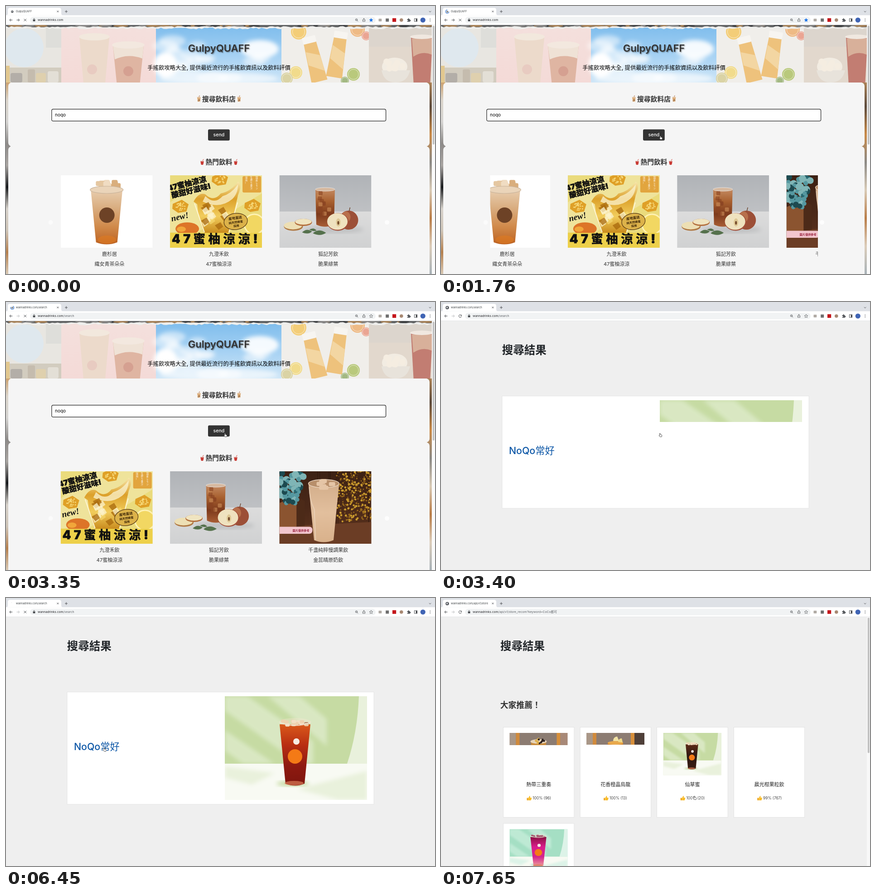
Recreate the animation shown at these times as an HTML page. Size 947x592 px, loop 8 s.

```html
<!DOCTYPE html>
<html lang="zh-Hant">
<head>
<meta charset="utf-8">
<style>
html,body{margin:0;width:100%;height:100%;overflow:hidden;background:#efefef}
svg{display:block;width:947px;height:592px;font-family:Inter,'Noto Sans CJK TC','Noto Sans CJK',sans-serif}
.mid{text-anchor:middle}
.bold{font-weight:700}
.black{font-weight:900;stroke:#111;stroke-width:.7}
</style>
</head>
<body>
<svg id="stage" viewBox="0 0 947 592"></svg>
<script>
const LOOP = 8000;
const TICKS = [0, 310, 770, 1020, 1240, 1390, 1570, 1760, 1950, 2210, 2460, 2600, 2750, 2930, 3240, 3350,
  3400, 4040, 5100, 5180, 5260, 5340, 6450, 6530, 7090, 7170, 7650];
const CURSOR = [[1570, 485.5, 291], [2750, 484.5, 294], [4040, 486, 293], [5100, 420, 312], [5180, 310, 340],
  [5260, 240, 347], [5340, 218, 335], [7090, 400, 390], [7170, 560.5, 441.5]];

const rect = (x, y, w, h, fill, more = '') => `<rect x="${x}" y="${y}" width="${w}" height="${h}" fill="${fill}" ${more}/>`;
const oval = (x, y, rx, ry, fill, more = '') => `<ellipse cx="${x}" cy="${y}" rx="${rx}" ry="${ry}" fill="${fill}" ${more}/>`;
const dot = (x, y, r, fill, more = '') => oval(x, y, r, r, fill, more);
const path = (d, fill, more = '') => `<path d="${d}" fill="${fill}" ${more}/>`;
const line = (d, color, w = 1, more = '') => path(d, 'none', `stroke="${color}" stroke-width="${w}" ${more}`);
const text = (x, y, size, s, fill = '#333', more = '') => `<text x="${x}" y="${y}" font-size="${size}" fill="${fill}" ${more}>${s}</text>`;
const group = (s, more = '') => `<g ${more}>${s}</g>`;
const at = (x, y, s, scale = 1) => group(s, `transform="translate(${x} ${y}) scale(${scale})"`);
const clipRect = (id, x, y, w, h) => `<clipPath id="${id}">${rect(x, y, w, h, '#000')}</clipPath>`;
const gradient = (id, ...colors) => `<linearGradient id="${id}" x2="0" y2="1">${colors.map((c, i) =>
  `<stop offset="${i / (colors.length - 1)}" stop-color="${c}"/>`).join('')}</linearGradient>`;
const noise = n => { const v = Math.sin(n * 12.9898) * 43758.5453; return v - Math.floor(v); };
const scatter = (n, seed, draw) => Array.from({length: n}, (_, i) =>
  draw(noise(seed + i * 3), noise(seed + i * 3 + 1), noise(seed + i * 3 + 2))).join('');
const pick = (list, u) => list[Math.floor(u * list.length)];
const tumbler = (x, top, bottom, wTop, wBottom, fill, more) => path(
  `M${x - wTop / 2} ${top}H${x + wTop / 2}L${x + wBottom / 2} ${bottom - 4}Q${x} ${bottom + 5} ${x - wBottom / 2} ${bottom - 4}Z`, fill, more);

const defs = `<defs>
${gradient('sky', '#7dbcec', '#a3d0f3', '#cfe6f7')}
${gradient('milkTea', '#e8cdae', '#d9ad80', '#d18b4c', '#bc6222')}
${gradient('honey', '#f7e7ac', '#dca02a', '#f1cc5c', '#c88a1c')}
${gradient('amber', '#c48a62', '#a8602f', '#7d3a1c', '#a85d34')}
${gradient('latte', '#d3ae8b', '#e2bf9d', '#d9b18b')}
${gradient('redTea', '#d9591b', '#b92f12', '#8f1a10', '#7d150e')}
${gradient('darkTea', '#5b2a16', '#2c1712', '#3a1c12')}
${gradient('berry', '#8e1244', '#d91c8c', '#d3258d', '#f0a49b')}
${gradient('wall', '#b0b3b7', '#bfc1c4')}
${gradient('table', '#dcdcdc', '#d0d1d2')}
${gradient('wood', '#3c2114', '#4a2818', '#5e341e')}
${gradient('leftEdge', '#c9975c', '#dcd6cc', '#d6d5d3', '#8d8a88', '#a9a5a2', '#15171a', '#d8d3cc', '#cfc5b8', '#b5804e', '#d9c9b4')}
${gradient('rightEdge', '#b88b5b', '#5b4a3c', '#c98a48', '#8c8a86', '#d9cbb7', '#b97d48', '#dccdba', '#a8b2b8')}
${gradient('pinkWall', '#f4e0dd', '#f4dad7')}
<filter id="soft"><feGaussianBlur stdDeviation="5"/></filter>
<filter id="shadow"><feDropShadow dx="1.3" dy="1.3" stdDeviation=".8" flood-opacity=".45"/></filter>
${clipRect('bannerClip', 0, 42, 940, 127)}${clipRect('track', 108.5, 370, 723.5, 222)}${clipRect('photo', 0, 0, 203, 160)}
${clipRect('wide', 0, 0, 314, 229)}${clipRect('tabText', 20, 4, 84, 18)}${clipRect('strip1', 0, 0, 128, 27)}${clipRect('strip2', 0, 0, 128, 26)}
<clipPath id="loaded"><rect id="loadedRect" x="483" y="217" width="314" height="229"/></clipPath></defs>`;

function browser() {
  const ink = '#44474b';
  return rect(0, 0, 947, 20.5, '#dee1e6') + path('M0 20.5Q4 20.5 4 16V9Q4 4 9 4H117Q122 4 122 9V16Q122 20.5 126 20.5Z', '#fff')
    + rect(0, 20.5, 947, 21, '#fff') + rect(0, 41, 947, .6, '#dcdee1')
    + group(text(22, 14.4, 5.75, '', '#3c4043', 'id="tabTitle"'), 'clip-path="url(#tabText)"')
    + line('M112.6 10.3l3.6 3.6m0-3.6l-3.6 3.6M130 12.2h6m-3-3v6M933.8 11.2l2.3 2.2 2.3-2.2', ink, .9)
    + line('M14.2 31H8m2.8-2.9L7.9 31l2.9 2.9', ink, 1)
    + line('M23.4 31h6.2m-2.8-2.9l2.9 2.9-2.9 2.9', ink, 1, 'id="forward"')
    + line('M39.7 28.4l5.2 5.2m0-5.2l-5.2 5.2', ink, 1, 'id="stop"')
    + group(line('M44.7 29.2A3 3 0 1 0 45.2 32', ink, 1) + path('M45.6 27.8v2.9h-2.9z', ink), 'id="reload"')
    + rect(53, 23.8, 763, 14.4, '#f1f3f4', 'rx="7.2"')
    + rect(59.6, 30, 4.8, 3.8, ink, 'rx=".6"') + line('M60.6 30v-1a1.4 1.4 0 0 1 2.8 0v1', ink, .8)
    + text(70, 33.4, 6.75, '<tspan fill="#202124">wannadrinks.com</tspan><tspan id="urlPath"></tspan>', '#5f6368')
    + dot(773.6, 30.4, 2.2, 'none', `stroke="${ink}" stroke-width=".8"`) + line('M775.2 32l2.1 2.1M772.5 30.4h2.2', ink, .8)
    + line('M788.4 30h-1v4h5.2v-4h-1M790 32.2v-5m-1.5 1.4l1.5-1.5 1.5 1.5', ink, .8)
    + path('M806 27.2l1.1 2.5 2.7.2-2.1 1.8.7 2.7-2.4-1.4-2.4 1.4.7-2.7-2.1-1.8 2.7-.2z', 'none', 'id="star" stroke-width=".7"')
    + rect(822.5, 28, 6.8, 6, '#b1aba5', 'rx="1"') + rect(838.2, 27.6, 7, 7, '#6d6d6d') + rect(853, 27, 8.2, 8, '#c4161c')
    + dot(872.8, 31, 3.8, '#a78872')
    + path('M885.5 29h2a1.3 1.3 0 1 1 2.4 0h1.8v2a1.3 1.3 0 1 1 0 2.3v1.5h-6.2v-1.6a1.3 1.3 0 1 0 0-2.3z', '#55585c')
    + rect(901.4, 28, 6.2, 6, 'none', `stroke="${ink}" stroke-width=".9"`) + rect(904.8, 28, 2.8, 6, ink)
    + dot(920.3, 31, 5.6, '#4064b4') + [28.3, 31, 33.7].map(y => dot(936.2, y, .75, ink)).join('')
    + '<g id="tabIcon"></g>';
}

function banner() {
  const tube = (x, y, turn) => group(path('M-14-38H14L18 50H-18Z', '#eec27c') + rect(-15, -52, 30, 15, '#f7f5f1', 'rx="2"')
    + path('M-14-20L15-6 17 30-15 10Z', '#f3d6a2'), `transform="translate(${x} ${y}) rotate(${turn})"`);
  const slice = (x, y, r, c) => dot(x, y, r, c) + dot(x, y, r * .8, 'none', 'stroke="#fff" stroke-opacity=".6"');
  const torn = 'M0 46' + Array.from({length: 158}, (_, i) => `L${i * 6} ${44.5 + 3 * noise(i)}`).join('')
    + Array.from({length: 158}, (_, i) => `L${942 - i * 6} ${47.5 + 4 * noise(i + 300)}`).join('') + 'Z';
  return group(rect(0, 42, 122, 127, '#e8e6e1') + rect(88, 42, 34, 50, '#dededa') + rect(0, 136, 122, 33, '#d2ccbf')
    + dot(40, 92, 43, '#dfe8ee') + rect(0, 132, 8, 37, '#e2c88f') + rect(10, 148, 26, 21, '#b3aea8', 'rx="4"')
    + rect(48, 140, 16, 29, '#c5bcae', 'rx="3"') + rect(66, 148, 22, 21, '#dfd0ae', 'rx="4"') + rect(92, 144, 24, 25, '#e3dfd6', 'rx="4"')
    + rect(122, 42, 209, 127, 'url(#pinkWall)') + tumbler(195, 70, 174, 66, 48, '#ecdacb') + oval(195, 68, 34, 8, '#f2e8dd')
    + tumbler(270, 88, 180, 68, 50, '#dfb5a2') + path('M236 88H304L301 116Q270 104 240 118Z', '#efe2d6') + oval(270, 86, 36, 8, '#f3e8df')
    + dot(190, 140, 11, '#e8cbc1') + dot(270, 144, 11, '#d5a091')
    + rect(331, 42, 277, 127, 'url(#sky)') + group(scatter(18, 40, (a, b, c) =>
      oval(345 + a * 250, 70 + b * 95, 14 + c * 26, 7 + c * 10, '#fff', 'opacity=".5"')) + oval(352, 130, 26, 28, '#fff')
      + oval(560, 95, 42, 20, '#fff', 'opacity=".9"') + oval(470, 160, 130, 14, '#fff', 'opacity=".6"'), 'filter="url(#soft)"')
    + rect(608, 42, 193, 127, '#f0eeea') + slice(646, 57, 17, '#f3cd78') + slice(776, 52, 16, '#eeba85') + slice(795, 66, 10, '#eaa593')
    + slice(640, 147, 14, '#f1db8c') + slice(620, 160, 13, '#dad3a5') + tube(680, 118, -14) + tube(732, 108, 9)
    + slice(767, 151, 14, '#b9c97c') + slice(748, 165, 9, '#a3b983')
    + rect(801, 42, 139, 127, '#e2d8cd') + rect(801, 42, 139, 48, '#dcd5cd') + oval(858, 134, 28, 20, '#f2ece2')
    + path('M829 142H892Q886 169 860 169Q834 169 829 142Z', '#e8e3db') + scatter(8, 9, (a, b) => dot(840 + a * 36, 120 + b * 18, 7, '#f5ede1'))
    + tumbler(918, 70, 180, 48, 36, '#c27d72') + path('M896 72H941V108Q920 98 899 112Z', '#d8b09a') + oval(918, 68, 26, 5, '#f0e8e0')
    + rect(0, 42, 940, 5, '#626465') + scatter(60, 77, (a, b, c) => oval(a * 940, 44, 8 + c * 9, 2, pick(['#3f4143', '#8a8988', '#a98358'], b)))
    + path(torn, '#eeeeec'), 'clip-path="url(#bannerClip)"');
}

const teaPhoto = () => rect(0, 0, 203, 160, '#fff')
  + scatter(20, 5, (a, b) => rect(68 + a * 55, 10 + b * 16, 13, 11, pick(['#e5c7a1', '#f0dcc2', '#d9ae7d'], a), 'rx="3"'))
  + tumbler(101.5, 32, 152, 70, 47, 'url(#milkTea)') + oval(101.5, 32, 36.5, 8, '#ead4b9', 'stroke="#c9b39a" stroke-width="1.2"')
  + dot(102, 88, 17, '#6d4226') + oval(102, 142, 20, 9, '#e07c22', 'opacity=".6"');

function posterPhoto() {
  const comb = (x, y) => at(x, y, path('M-17-5L3-14 18-4 13 12-5 15-18 6Z', '#dfa027')
    + scatter(24, x, (a, b) => dot(-11 + a * 22, -7 + b * 16, 1.5, '#f6d777')));
  const label = (x, s) => text(x, 0, 5.2, [...s].map(c => `<tspan x="${x}" dy="6">${c}</tspan>`).join(''), '#fff');
  return rect(0, 0, 203, 160, '#eadb7c') + path('M0 60L80 0H203V40L60 126H0Z', '#efe39b')
    + comb(110, 8) + comb(23, 68) + comb(182, 66) + oval(38, 118, 26, 14, '#dd7428') + oval(25, 119, 10, 6, '#f1a63a')
    + dot(186, 108, 22, '#f2d762', 'stroke="#fff2b4" stroke-width="3"')
    + group(text(-2, 34, 16.5, '47蜜柚涼涼', '#111', 'class="black"') + text(2, 51, 16.5, '酸甜好滋味!', '#111', 'class="black"'), 'transform="rotate(-14 0 40)"')
    + rect(160, 2, 41, 36, '#e2a53e', 'rx="3"') + at(0, 1, label(166, '採用!') + label(177, '生搾り果汁') + label(189, '国産レモン'))
    + path('M52 58Q64 36 78 42Q96 60 112 40Q134 36 150 14Q160 20 150 44L143 75Q137 108 128 128H76Q62 95 60 64Z', 'url(#honey)')
    + path('M78 46Q98 66 116 46Q136 40 150 20Q150 40 138 52Q110 76 72 58Z', '#fbf3cf', 'opacity=".75"')
    + scatter(18, 31, (a, b, c) => path(`M${66 + a * 55} ${62 + b * 52}l${8 + c * 10}-7 6 10-10 7z`, pick(['#fdf3cb', '#a9690c', '#f5d66c'], c), 'opacity=".75"'))
    + line('M54 62L76 126M149 60L130 126', '#fff6d4', 2)
    + rect(0, 127, 203, 33, '#edd04a')
    + text(4, 102, 19, 'new!', '#111', 'font-style="italic" font-weight="700" font-family="\'Liberation Serif\',serif" transform="rotate(-13 4 102)"')
    + group(oval(145, 102, 26, 18, '#dcb24a', 'stroke="#523512" stroke-width="1.2"')
      + text(145, 97, 7.5, '産地直送', '#3b2508', 'class="mid bold"') + text(145, 106, 6.3, '純天然蜂蜜', '#3b2508', 'class="mid bold"')
      + text(145, 114, 6.3, '採用', '#3b2508', 'class="mid bold"'), 'transform="rotate(-8 145 102)"')
    + text(4, 149.5, 26.5, '47蜜柚涼涼!', '#111', 'class="black" letter-spacing="6.5"');
}

const applePhoto = () => rect(0, 0, 203, 82, 'url(#wall)') + rect(0, 80, 203, 80, 'url(#table)') + oval(120, 120, 66, 8, '#c0c1c2', 'filter="url(#soft)"')
  + dot(153, 99, 21, '#9c4f37') + oval(147, 92, 10, 12, '#b8704c') + line('M154 79l2-8', '#6a4029', 1.4)
  + tumbler(101, 30, 113, 43, 39, 'url(#amber)') + oval(101, 31, 21.5, 4, '#d6b9a0', 'stroke="#eee" stroke-width=".8"')
  + scatter(14, 61, (a, b, c) => rect(82 + a * 30, 32 + b * 52, 9, 9, c > .5 ? '#c98a56' : '#8b4423', 'rx="2" opacity=".65"'))
  + oval(129, 103, 24, 19.5, '#a3503a') + oval(128, 102, 22.5, 18.3, '#efe2bf') + oval(130, 104, 5, 9, '#ddc794') + oval(130, 105, 2, 4, '#6f4526')
  + oval(31, 113, 21, 9.5, '#b07a45') + oval(30, 111, 20, 8.5, '#eddfb4') + oval(53, 104, 19, 8, '#b4703f') + oval(53, 102.5, 18, 6.5, '#f0e4c0')
  + path('M50 126Q60 116 72 124Q64 132 50 126ZM74 128Q86 116 103 127Q90 136 74 128ZM66 120Q76 114 82 122Q74 125 66 120Z', '#55714c');

const lattePhoto = () => rect(0, 0, 203, 160, 'url(#wood)') + scatter(12, 3, a => rect(a * 200, 0, 1.2, 118, '#27150c', 'opacity=".5"'))
  + path('M0 122L203 112V160H0Z', '#6b3d25') + path('M0 70L38 55V122L0 140Z', '#8b5430') + path('M38 55L56 66V120L38 122Z', '#4c2a18')
  + scatter(420, 17, (a, b, c) => dot(126 + a * 77, b * 112 - a * 6, .8 + c * 1.7, pick(['#6d4516', '#99691c', '#c99a2e'], c)))
  + scatter(70, 90, (a, b, c) => dot(a * 55 * (1 - b * .3), 4 + b * 68, 3 + c * 5, pick(['#266872', '#5598a0', '#1c4a50', '#7fb5b6'], c)))
  + tumbler(98, 26, 156, 68, 43, 'url(#latte)') + line('M66 35Q66 62 77 84L80 152', '#f1dcc8', 2, 'opacity=".6"')
  + oval(98, 27, 34, 9, '#b88f6b', 'stroke="#ecd9c6" stroke-width="1.3"')
  + scatter(7, 23, (a, b) => rect(70 + a * 42, 17 + b * 15, 14, 9, '#e5c5a6', 'rx="3"'))
  + path('M0 122.5H66Q73 122.5 73 130T66 138H0Z', '#f2c6ce') + text(29, 132.6, 6.2, '圖片僅供參考', '#9c2440', 'class="bold"');

const DRINKS = [['鹿杉居', '織女青茶朵朵', teaPhoto], ['九澄禾飲', '47蜜柚涼涼', posterPhoto],
  ['狐記芳飲', '脆果緋葉', applePhoto], ['千盞純粹慢調果飲', '金蕊晴原奶飲', lattePhoto]];
const PITCH = 241.4;
const slide = ([shop, drink, photo], i) => at(120.7 + PITCH * i, 374, group(photo(), 'clip-path="url(#photo)"')
  + text(107.8, 177.7, 11, shop, '#333', 'class="mid"') + text(107.8, 199.8, 11, drink, '#333', 'class="mid"'));

function home() {
  const bubbleTea = path('M-4.2-4H4.2L3 7H-3Z', '#dcae7c') + rect(-4.8, -5, 9.6, 1.5, '#e9d9c4') + line('M0-5L2-8', '#a8623b', 1.2)
    + [-1.6, 1.6, 0].map((x, i) => dot(x, 5 - i * 1.3, .9, '#57331f')).join('');
  const juice = path('M-4.5-3H4.5L3 6Q0 8 -3 6Z', '#c93b35') + rect(-4.5, -4, 9, 2, '#e8cfc9') + line('M1-4L4-8', '#d65a50', 1.2);
  return rect(0, 41.5, 947, 551, '#f4f4f4') + rect(0, 160, 10, 432, 'url(#leftEdge)') + rect(929, 160, 11, 432, 'url(#rightEdge)') + banner()
    + rect(940, 41.5, 7, 551, '#fafafa') + rect(941.8, 43.5, 4, 262.5, '#c1c1c1', 'rx="2"')
    + rect(5, 169, 930, 141, '#f5f5f5', 'rx="8"') + rect(5, 310, 930, 300, '#f5f5f5', 'rx="8"')
    + text(470, 101.3, 22, 'GulpyQUAFF', '#333', 'class="mid" font-weight="600" filter="url(#shadow)"')
    + text(470, 140.6, 12.35, '手搖飲攻略大全, 提供最近流行的手搖飲資訊以及飲料評價', '#000', 'class="mid" font-weight="500"')
    + text(470, 210.6, 14.8, '搜尋飲料店', '#333', 'class="mid bold"') + at(425.8, 205, bubbleTea, .9) + at(514.5, 205, bubbleTea, .9)
    + rect(100.9, 227.9, 737.7, 26.3, '#fff', 'id="field" rx="3.5" stroke-width="1.2"') + text(108, 244.3, 10, 'noqo', '#000')
    + rect(446, 272.4, 47.8, 24.9, '#333', 'rx="3"') + text(469.9, 288.2, 10.5, 'send', '#fff', 'class="mid" font-weight="500"')
    + text(470, 350, 14.7, '熱門飲料', '#333', 'class="mid bold"') + at(433, 345, juice, .85) + at(507, 345, juice, .85)
    + dot(98.5, 478, 5, '#fbfbfb') + dot(841, 478, 5, '#fdfdfd')
    + group(group(DRINKS.map(slide).join(''), 'id="slides"'), 'clip-path="url(#track)"');
}

// Bright studio shot with one cup; the card thumbnails reuse it scaled down.
const studio = (leaf, light, pale, liquid, cup = '') => group(rect(0, 0, 314, 229, leaf)
  + path('M0 0H50L195 100V149H165L0 32ZM95 0H165L225 50V110ZM0 75L110 149H40L0 120Z', light, 'filter="url(#soft)" opacity=".8"')
  + path('M296 0H314V149H270Q293 80 296 0Z', pale) + rect(0, 149, 314, 80, '#f8faf3')
  + path('M0 155L110 170 60 195 0 180ZM160 205L314 165V229H250Z', pale, 'filter="url(#soft)"')
  + oval(150, 193, 36, 6, leaf, 'filter="url(#soft)"')
  + group(tumbler(155, 62, 197, 68, 42, `url(#${liquid})`) + scatter(12, 12, (a, b, c) =>
    rect(124 + a * 52, 50 + b * 10, 10, 7, liquid == 'berry' ? '#7c173f' : pick(['#8a4520', '#e9c9a0', '#f0dcc0'], c), 'rx="3"'))
    + oval(155, 57, 35, 9, '#f5e6d2', 'opacity=".35"') + line('M120 57Q155 72 190 57', '#efe4d4', 1.6)
    + oval(153, 192, 21, 5, '#d97b58', 'opacity=".7"') + dot(158, 100, 7, '#f7ece4') + dot(155, 133, 16, '#f47a16'), cup), 'clip-path="url(#wide)"');
const greenStudio = liquid => studio('#c6dba3', '#deebca', '#e9f1dc', liquid);

const results = () => rect(0, 41.5, 947, 551, '#efefef') + text(134.7, 115.3, 24.5, '搜尋結果', '#212529', 'class="bold"')
  + rect(135, 207.8, 677, 248, '#fff', 'stroke="#dfdfdf" stroke-width=".7"')
  + text(150, 336.4, 21.3, 'NoQo常好', '#0b56a6', 'font-weight="500"')
  + group(at(483, 217, greenStudio('redTea')), 'clip-path="url(#loaded)"');

const shelf = (clip, right, topping) => group(rect(0, 0, 128, 93, '#8c7c72') + rect(0, 0, 14, 93, '#a99788')
  + rect(14, 0, 8, 93, '#d08a3c') + rect(right, 0, 8, 93, '#d78f3b') + rect(right + 8, 0, 40, 93, clip == 'strip1' ? '#a88978' : '#4f4039')
  + topping, `clip-path="url(#${clip})"`);
const THUMBS = [
  () => shelf('strip1', 104, tumbler(64, 18, 90, 34, 24, '#c98b3c') + oval(64, 19, 18, 5, '#e6d3b8')
    + scatter(14, 8, (a, b) => dot(50 + a * 28, 13 + b * 10, 2.2, a > .5 ? '#2c211e' : '#dfb04c'))),
  () => shelf('strip2', 98, tumbler(64, 21, 90, 34, 24, '#d8862a') + oval(64, 22, 17, 4, '#e9a94c')
    + path('M59 18A9 9 0 0 1 68 8L72 18Z', '#f2e3a4') + path('M70 20A8 8 0 0 1 78 12L80 21Z', '#efd98a')),
  () => at(0, 0, greenStudio('darkTea'), .408),
  () => '',
  () => at(0, 0, studio('#a5dfc4', '#c5ecd9', '#ddf3e8', 'berry', 'transform="translate(-41 -30) scale(1.27 1.18)"'), .408)];
const MENU = [['熱帶三重奏', '100% (96)'], ['花香橙晶烏龍', '100% (13)'], ['仙草蜜', '100% (20)'], ['晨光柑果粒飲', '99% (767)'], ['', '']];

// Before the pictures arrive their boxes have no height.
function menu(loaded) {
  const room = loaded ? 93 : 0;
  const thumb = path('M-1.5-.5L1-5Q3-5 2-1H5Q6 0 5.3 1.2L4.3 4.5Q4 5 3 5H-1.5Z', '#f9bd2c') + rect(-5, -.5, 3.2, 5.6, '#eda620', 'rx=".8"');
  const card = ([name, score], i) => at(137.5 + 169.6 * (i % 4), 285.5 + Math.floor(i / 4) * (119.5 + room),
    rect(0, 0, 156.4, 106 + room, '#fff', 'stroke="#dcdcdc" stroke-width=".7"') + (loaded ? at(13.9, 12.5, THUMBS[i]()) : '')
    + text(78.2, 37 + room, 11, name, '#222', 'class="mid"')
    + (score ? at(57, 63.5 + room, thumb) + text(64.8, 66.6 + room, 8.3, score, '#444') : ''));
  return rect(0, 41.5, 947, 551, '#efefef') + rect(940, 41.5, 7, 551, '#f8f8f8')
    + rect(941.8, 43.5, 4, loaded ? 299 : 366, '#c1c1c1', 'rx="2"')
    + text(131, 115.3, 24.5, '搜尋結果', '#212529', 'class="bold"') + text(130.8, 243.3, 17.8, '大家推薦！', '#333', 'class="bold"')
    + MENU.map(card).join('');
}

const hand = path('M-2-3.6Q-1.2-4.6-.4-3.6L0-1.2 2.4-.6Q3.4-.2 3.2 1L2.6 3.8H-1.4L-3.4.8Q-3-.2-1.8.6Z', '#fff', 'stroke="#333" stroke-width=".8"');
const pages = {home: home(), results: results(), waiting: menu(false), menu: menu(true)};
const stage = document.getElementById('stage');
stage.innerHTML = defs + Object.entries(pages).map(([id, s]) => group(s, `id="${id}"`)).join('') + browser() + group(hand, 'id="cursor"');
const $ = id => document.getElementById(id);
const show = (id, on) => $(id).setAttribute('display', on ? 'inline' : 'none');
const set = (id, name, value) => $(id).setAttribute(name, value);

function ease(x) {
  if (x <= 0 || x >= 1) return x <= 0 ? 0 : 1;
  const bezier = (u, a, b) => 3 * u * (1 - u) ** 2 * a + 3 * u * u * (1 - u) * b + u ** 3;
  let lo = 0, hi = 1;
  for (let i = 0; i < 20; i++) { const m = (lo + hi) / 2; bezier(m, .25, .25) < x ? lo = m : hi = m; }
  return bezier(lo, .1, 1);
}

function tabIcon(t, loading) {
  if (t == 6450) return dot(12.3, 10, .4, '#aaa');
  const r = loading ? (t < 310 ? 2.6 : 2) : 3.7;
  const globe = dot(13.8, 12.4, r, '#4b4f54') + path(`M${13.8 - r * .7} 12l${r * .8}-${r * .6} ${r * .3} ${r * .5}-${r * .4} ${r * .9}z`, '#d5d7da');
  return globe + (loading && t >= 310 ? line('M13.8 8.6A3.8 3.8 0 1 0 17.6 12.4', '#2b6fd0', 1.1, `transform="rotate(${t * .41 % 360} 13.8 12.4)"`) : '');
}

function update(now) {
  const t = TICKS.findLast(tick => tick <= now % LOOP);
  const page = t < 3400 ? 'home' : t < 6530 ? 'results' : t < 7650 ? 'waiting' : 'menu';
  const loading = t < 3400 || t == 6450;
  const searched = t >= 3240;
  for (const id in pages) show(id, id == page);
  show('stop', loading);
  show('reload', !loading);
  set('forward', 'stroke', searched ? '#b9bbbe' : '#44474b');
  set('star', 'fill', searched ? 'none' : '#1a73e8');
  set('star', 'stroke', searched ? '#44474b' : '#1a73e8');
  const route = !searched ? '' : t < 6530 ? '/search' : '/api/v1/store_recom?keyword=CoCo都可';
  $('urlPath').textContent = route;
  $('tabTitle').textContent = searched ? 'wannadrinks.com' + route : 'GulpyQUAFF';
  $('tabIcon').innerHTML = tabIcon(t, loading);
  set('field', 'stroke', t >= 1020 && t < 1760 ? '#1a62b0' : '#222');
  set('slides', 'transform', `translate(${-PITCH * ease((t - 1650) / 500)} 0)`);
  set('loadedRect', 'height', t < 4040 ? 48 : 229);
  const spot = CURSOR.findLast(([time]) => time <= t);
  show('cursor', spot);
  if (spot) set('cursor', 'transform', `translate(${spot[1]} ${spot[2]})`);
}

const start = performance.now();
function frame() {
  update(performance.now() - start);
  requestAnimationFrame(frame);
}
update(0);
requestAnimationFrame(frame);
</script>
</body>
</html>
```
